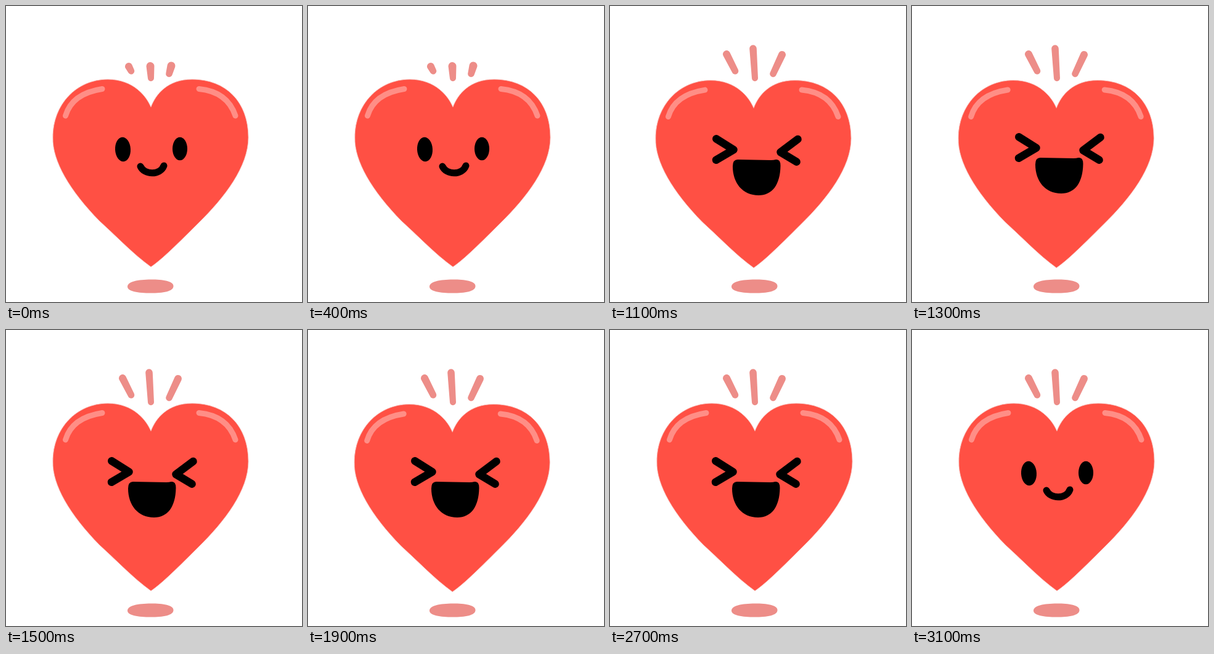
An HTML page for the animation above (3.2 s loop, 480 by 480 pixels).

```html
<!DOCTYPE html>
<html lang="en">
<head>
<meta charset="utf-8">
<title>Laughing heart</title>
<style>
  html, body { margin: 0; width: 100%; height: 100%; overflow: hidden; background: #fff; }
  svg { display: block; width: 100%; height: 100%; }
  .pale { fill: #ed8d88; }
  .body { fill: #ff5044; stroke: #f6b9b4; stroke-width: .8; }
  .line { fill: none; stroke-linecap: round; stroke-linejoin: round; }
  .shine { stroke: #ff8e86; stroke-width: 9; }
  .ink { stroke: #000; stroke-width: 12.6; }
  #smile .ink { stroke-width: 11; }
</style>
</head>
<body>
<svg viewBox="0 0 480 480">
  <path class="pale" d="M197 455C197 447 214 443.500 235 443.500C255 443.500 271 446 271.500 454C272 463 254 465.500 235 465.500C214 465.500 197 463 197 455Z"/>
  <path id="rays" class="pale"/>
  <g id="heart">
    <path class="body" d="M235 164C228 147 207 119 165 119C114 119 76 160 76 213C75 251 103 299 152 349C185 379 205 401 235 423C250 413 270 394 312 352C355 310 393 260 393 213C393 156 357 119 302 119C262 119 243 143 235 164Z"/>
    <path class="line shine" d="M96.500 178Q107 142 156 134.500M313 134.500Q359 139 372 178"/>
  </g>
  <g id="smile">
    <ellipse cx="189.500" cy="232.500" rx="12.500" ry="19.800" transform="rotate(-3 189.500 232.500)"/>
    <ellipse cx="282" cy="231.500" rx="12" ry="18.800"/>
    <path class="line ink" d="M218 260C224 274 250 275 256 259"/>
  </g>
  <g id="laugh">
    <path class="line ink" d="M171.300 212.300L199.500 230L171 246.700M303.500 213L275.500 234L301.500 249.700"/>
    <path d="M206 246L260 247Q264 247 268 246Q275.500 245 275.500 256C275 287 262 304 240 304C214 304 198 284 198 257Q198 246 206 246Z"/>
  </g>
</svg>
<script>
const STEP = 100, STEPS = 32, LAUGH_START = 6, LAUGH_END = 30;
const $ = id => document.getElementById(id);

// Jitter of the heart and of the laughing face, three drawings in turn.
const HEART = [[0, 0], [-0.8, 1.5], [-2, 1.6]];
const FACE = [[0, 0], [2, 0], [1, 3]];

// Each ray: fixed foot [x, y, r] and a tip [x, y, r] per length.
const RAYS = [
  { foot: [203, 105.5, 5.3], tips: [[199, 98, 6], [189, 78, 6], [178, 58, 6]] },
  { foot: [235, 117, 5], tips: [[234, 97.5, 6.5], [232, 69, 5.8], [231, 41, 5.8]] },
  { foot: [264.5, 110, 5.3], tips: [[268, 97, 6.5], [279, 79, 6], [290, 61, 6]] }
];
const LENGTHS = [0, 1, 2, 1];

function taper([x1, y1, r1], [x2, y2, r2]) {
  const a = Math.atan2(y2 - y1, x2 - x1) + Math.PI / 2;
  const at = (x, y, r) => `${x + r * Math.cos(a)} ${y + r * Math.sin(a)}`;
  return `M${at(x1, y1, r1)}A${r1} ${r1} 0 0 1 ${at(x1, y1, -r1)}` +
         `L${at(x2, y2, -r2)}A${r2} ${r2} 0 0 1 ${at(x2, y2, r2)}Z`;
}

const rayPaths = [0, 1, 2].map(n => RAYS.map(r => taper(r.tips[n], r.foot)).join(""));
const move = (id, [x, y]) => $(id).setAttribute("transform", `translate(${x} ${y})`);

function draw() {
  const n = Math.floor(performance.now() / STEP) % STEPS;
  const laughing = n >= LAUGH_START && n < LAUGH_END;
  const pose = laughing ? n % 3 : 0;
  $("rays").setAttribute("d", rayPaths[LENGTHS[n % 4]]);
  move("heart", HEART[pose]);
  move("laugh", FACE[pose]);
  $("laugh").style.display = laughing ? "" : "none";
  $("smile").style.display = laughing ? "none" : "";
  requestAnimationFrame(draw);
}
draw();
</script>
</body>
</html>
```
